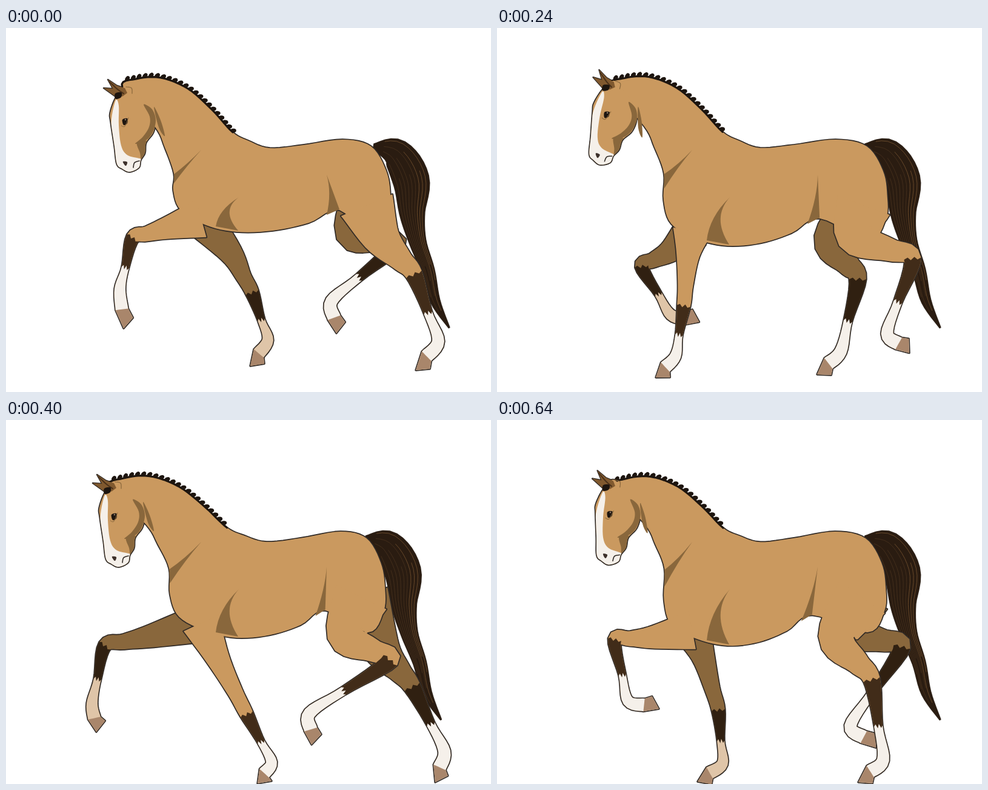
Recreate the animation shown at these times as an HTML page with a canvas. Size 800x600 px, loop 720 ms.

```html
<!DOCTYPE html>
<html lang="en">
<head>
<meta charset="utf-8">
<title>Trotting horse</title>
<style>
html, body { margin: 0; width: 100%; height: 100%; overflow: hidden; background: #fff; }
canvas { display: block; }
</style>
</head>
<body>
<canvas id="stage" width="800" height="600"></canvas>
<script>
const ctx = document.getElementById('stage').getContext('2d');
const COAT = '#ca995f', SHADE = '#89673c', LINE = '#302a26', HAIR = '#2a1c11', KNOT = '#1d150f';
const HOOF = '#a9866b', WHITE = '#f5f0ea', PEACH = '#dfc5a8';
const STEP = 80, N = 6, POLL = [192, 98];

// Half widths from the top of a leg down to the hoof
const FORE = { root: [322, 314], widths: [32, 19, 12.5, 11, 6, 9, 10.5] };
const HIND = { root: [595, 292], widths: [46, 31, 19, 14, 7, 10, 11] };

// Head: shift and turn about the poll. Neck: shift. Trunk: rump shift, belly drop.
// Legs: elbow or stifle, knee or hock, fetlock, toe.
const lift = {
  head: [0, 0, 0], neck: [0, 0], trunk: [0, 0],
  nearFore: [268,329, 209,346, 188,430, 194,495], nearHind: [619,345, 673,406, 713,516, 676,564],
  farFore: [371,371, 406,436, 432,514, 403,557], farHind: [575,338, 645,357, 537,450, 545,503]
};
const fold = {
  head: [-2, -23, 19], neck: [-7, -17], trunk: [12, 10],
  nearFore: [290,360, 251,438, 217,515, 193,556], nearHind: [601,342, 703,386, 704,503, 735,531],
  farFore: [315,376, 283,424, 357,482, 400,493], farHind: [546,342, 572,400, 497,506, 460,545]
};
const stand = {
  head: [-4, 1, 6.5], neck: [-2, 14], trunk: [7, 36],
  nearFore: [340,390, 365,478, 372,566, 331,596], nearHind: [582,346, 668,374, 583,504, 625,540],
  farFore: [258,358, 194,362, 216,463, 267,476], farHind: [561,359, 618,428, 637,560, 596,597]
};
const rise = {
  head: [-18, 5, 0], neck: [-22, 13], trunk: [-9, 23],
  nearFore: [350,394, 397,485, 438,564, 415,599], nearHind: [561,355, 634,396, 501,483, 504,535],
  farFore: [240,356, 163,372, 142,467, 149,514], farHind: [618,375, 670,440, 723,546, 708,597]
};
const reach = {
  head: [-1, -35, 12], neck: [-9, -31], trunk: [-6, 0],
  nearFore: [350,343, 403,443, 476,490, 510,519], nearHind: [576,334, 610,376, 526,470, 508,529],
  farFore: [248,342, 184,388, 126,453, 92,486], farHind: [630,338, 685,399, 761,508, 795,550]
};

// A trot repeats with near and far legs exchanged
const swap = p => ({ ...p, nearFore: p.farFore, nearHind: p.farHind, farFore: p.nearFore, farHind: p.nearHind });
const blend = (p, q) => Object.fromEntries(Object.keys(p).map(k => [k, lerp(p[k], q[k], .5)]));
const cycle = [lift, swap(reach), fold, blend(fold, stand), stand, rise, reach, swap(fold), swap(stand)];

function lerp(a, b, t) { return a.map((v, i) => v + (b[i] - v) * t); }
function clamp(v) { return Math.max(0, Math.min(1, v)); }
function group(a, size = 2) {
  return Array.from({ length: a.length / size }, (_, i) => a.slice(i * size, i * size + size));
}

// Catmull-Rom curve, N samples per span
function spline(p, closed) {
  const n = p.length, out = [];
  const at = i => closed ? p[(i + n) % n] : p[Math.max(0, Math.min(n - 1, i))];
  for (let i = 0; i < (closed ? n : n - 1); i++) {
    const [a, b, c, d] = [at(i - 1), at(i), at(i + 1), at(i + 2)];
    for (let k = 0; k < N; k++) {
      const t = k / N;
      out.push(b.map((v, j) => v + t / 2 * (c[j] - a[j] + t * (2 * a[j] - 5 * v + 4 * c[j] - d[j]
        + t * (3 * (v - c[j]) + d[j] - a[j])))));
    }
  }
  if (!closed) out.push(p[n - 1]);
  return out;
}

// Front and back edges of a curve through points [x, y, half width]
function ribbon(points) {
  const mid = spline(points);
  const edge = side => mid.map(([x, y, w], i) => {
    const a = mid[Math.max(0, i - 1)], b = mid[Math.min(mid.length - 1, i + 1)];
    const dx = b[0] - a[0], dy = b[1] - a[1], s = side * w / (Math.hypot(dx, dy) || 1);
    return [x + dy * s, y - dx * s];
  });
  return [edge(-1), edge(1)];
}

function trace(points, close = true) {
  const path = new Path2D();
  points.forEach(p => path.lineTo(p[0], p[1]));
  if (close) path.closePath();
  return path;
}
const blob = (...a) => trace(spline(group(a), true));
const curve = (...a) => trace(spline(group(a)), false);

function fill(path, color) { ctx.fillStyle = color; ctx.fill(path); }
function stroke(path, width = 3.4, color = LINE) {
  ctx.lineWidth = width;
  ctx.strokeStyle = color;
  ctx.stroke(path);
}

function limb(keys, { root, widths }, [rump, drop]) {
  const [mid, knee, fetlock, toe] = group(keys);
  const top = root === FORE.root ? [root[0], root[1] + drop * .9] : [root[0] + rump, root[1]];
  const joints = [top, mid, lerp(mid, knee, .6), knee, lerp(knee, fetlock, .58), fetlock, lerp(fetlock, toe, .52)];
  const [front, back] = ribbon(joints.map((p, i) => [...p, widths[i]]));
  const dx = toe[0] - fetlock[0], dy = toe[1] - fetlock[1], len = Math.hypot(dx, dy);
  front.push(toe);
  back.push([toe[0] + (17 * dy - 16 * dx) / len, toe[1] - (17 * dx + 16 * dy) / len]);
  return [front, back];
}

// Part of a leg from joint k down, with a ragged upper edge
function lower([l, r], k, rag = 0) {
  const i = k * N, [dx, dy] = [0, 1].map(j => l[i + 1][j] + r[i + 1][j] - l[i][j] - r[i][j]);
  const len = Math.hypot(dx, dy) || 1;
  const teeth = [.2, .4, .6, .8].map((t, n) => {
    const [x, y] = lerp(r[i], l[i], t), s = (n % 2 ? -rag : rag) / len;
    return [x + dx * s, y + dy * s];
  });
  return trace([...l.slice(i), ...r.slice(i).reverse(), ...teeth]);
}

function paintLeg(leg, coat, dark, sock) {
  fill(lower(leg, 0), coat);
  fill(lower(leg, 3, 2.5), dark);
  fill(lower(leg, 4, 3.5), sock);
  fill(lower(leg, 6), HOOF);
}

const tail = ribbon(group([606,196,5, 643,206,24, 668,250,30, 670,305,21, 679,352,14, 696,400,11, 708,450,8, 731,494,1], 3));
function drawTail(shift) {
  const [front, back] = tail;
  ctx.save();
  ctx.translate(shift, 0);
  const shape = trace([...front, ...back.slice().reverse()]);
  stroke(shape, 1.5, '#3a3028');
  fill(shape, HAIR);
  for (let i = 1; i < 10; i++) {
    const strand = front.map((p, j) => lerp(p, back[j], i / 10)).slice(3 + i % 3 * 4, 30 + i % 4 * 3);
    stroke(trace(strand, false), .8, i > 6 ? '#765330' : '#49331f');
  }
  ctx.restore();
}

const skull = blob(195,97, 181,115, 172,140, 173,155, 179,195, 183,224, 192,232, 204,237, 219,230, 222,218, 229,206,
  231,189, 243,172, 246,151, 238,128, 215,110);
const ears = [[161,99, 176,100, 190,106, 182,114], [168,85, 183,95, 196,99, 200,107, 192,113, 178,103]].map(a => trace(group(a)));
function inHead([x, y, turn], draw) {
  ctx.save();
  ctx.translate(POLL[0] + x, POLL[1] + y);
  ctx.rotate(turn * Math.PI / 180);
  ctx.translate(-POLL[0], -POLL[1]);
  draw();
  ctx.restore();
}
function outlineHead() {
  stroke(skull);
  ears.forEach(e => stroke(e, 2.4));
}
function paintHead() {
  fill(skull, COAT);
  ctx.save();
  ctx.clip(skull);
  fill(blob(181,119, 186,128, 186,160, 190,194, 201,210, 228,219, 215,242, 180,240, 174,190, 174,150), WHITE);
  fill(blob(232,186, 216,189, 221,206, 224,218, 236,202), SHADE);
  ctx.restore();
  fill(blob(227,126, 241,134, 247,152, 242,172, 231,185, 213,191, 226,179, 236,163, 237,146), SHADE);
  fill(blob(244,130, 255,152, 262,178, 252,164), SHADE);
  ears.forEach(e => fill(e, '#80592f'));
  stroke(curve(171,89, 184,101, 194,108), 2, '#493019');
  stroke(curve(198,97, 207,99, 208,108), 1.2, SHADE);
  fill(blob(180,108, 190,106, 190,114, 181,117), KNOT);
  fill(blob(192,151, 200,149, 200,157, 194,160), KNOT);
  fill(blob(196,150, 198,150, 198,152, 196,152), '#8b7764');
  stroke(curve(190,161, 196,162, 202,148), 1, SHADE);
  fill(blob(193,220, 200,221, 198,227, 195,225), '#3d302a');
  stroke(curve(220,219, 212,222, 210,230), 1.6);
}

function braids(crest) {
  stroke(trace(crest, false), 3, KNOT);
  let gap = 8;
  for (let i = 3; i < crest.length; i++) {
    const [a, b] = [crest[i - 1], crest[i]];
    const len = Math.hypot(b[0] - a[0], b[1] - a[1]), angle = Math.atan2(b[1] - a[1], b[0] - a[0]);
    for (; gap < len; gap += 9.8) {
      const [x, y] = lerp(a, b, gap / len);
      const knot = new Path2D();
      knot.ellipse(x + 3 * Math.sin(angle), y - 3 * Math.cos(angle), 4.6, 3.3, angle - .7, 0, 7);
      fill(knot, KNOT);
    }
    gap -= len;
  }
}

// Poll, crest, back, rump, belly, chest, throat
const torso = group([192,98, 215,84, 255,82, 300,100, 340,135, 374,172, 400,186, 435,198, 490,193, 555,184, 602,195, 627,235, 634,275,
  632,315, 605,350, 550,300, 500,321, 440,334, 380,336, 330,325, 288,300, 276,268, 277,240, 262,197, 246,163]);

// Neck follows the head, rump slides, and belly and chest sink
const shape = ({ neck, trunk: [rump, drop] }) => ([x, y]) => {
  const near = clamp(1 - Math.hypot(x - POLL[0], 1.6 * (y - POLL[1])) / 380);
  const low = x < 580 ? clamp((y - 240) / 40) * drop : 0;
  const rear = clamp((x - 400) / 150);
  return [x + neck[0] * near + rump * clamp((x - 520) / 100) - .9 * low * rear, y + neck[1] * near + low * (1 - .4 * rear)];
};

// Tip, two base points and bend of each crease
const creases = [
  { tip: [322, 201], a: [277, 241], b: [277, 256], bend: 0 },
  { tip: [384, 279], a: [346, 327], b: [383, 334], bend: -.6 },
  { tip: [529, 242], a: [529, 308], b: [550, 299], bend: .2 }
];
function drawCrease({ tip, a, b, bend }, move) {
  [a, b] = [move(a), move(b)];
  const pull = (p, k) => lerp(tip, p, .5).map((v, j) => v + k * (b[j] - a[j]));
  const path = new Path2D();
  path.moveTo(...tip);
  path.quadraticCurveTo(...pull(a, bend + .2), ...a);
  path.lineTo(...b);
  path.quadraticCurveTo(...pull(b, bend - .2), ...tip);
  fill(path, SHADE);
}

function draw(p) {
  ctx.fillStyle = '#fff';
  ctx.fillRect(0, 0, 800, 600);
  drawTail(1.5 * Math.min(0, p.trunk[0]));
  [[p.farHind, HIND, WHITE], [p.farFore, FORE, PEACH]].forEach(([keys, kind, sock]) => {
    const leg = limb(keys, kind, p.trunk);
    stroke(lower(leg, 0));
    paintLeg(leg, SHADE, '#302011', sock);
  });

  // Outline all near parts first, so their fills merge without seams
  const move = shape(p), outline = spline(torso.map(move), true), body = trace(outline);
  const legs = [limb(p.nearHind, HIND, p.trunk), limb(p.nearFore, FORE, p.trunk)];
  stroke(body);
  legs.forEach(leg => stroke(lower(leg, 0)));
  inHead(p.head, outlineHead);
  fill(body, COAT);
  legs.forEach(leg => paintLeg(leg, COAT, '#412c19', WHITE));
  creases.forEach(c => drawCrease(c, move));
  braids(outline.slice(0, 5 * N + 1));
  inHead(p.head, paintHead);
}

ctx.lineJoin = ctx.lineCap = 'round';
const start = performance.now();
function tick() {
  draw(cycle[Math.floor((performance.now() - start) / STEP) % cycle.length]);
  requestAnimationFrame(tick);
}
tick();
</script>
</body>
</html>
```
